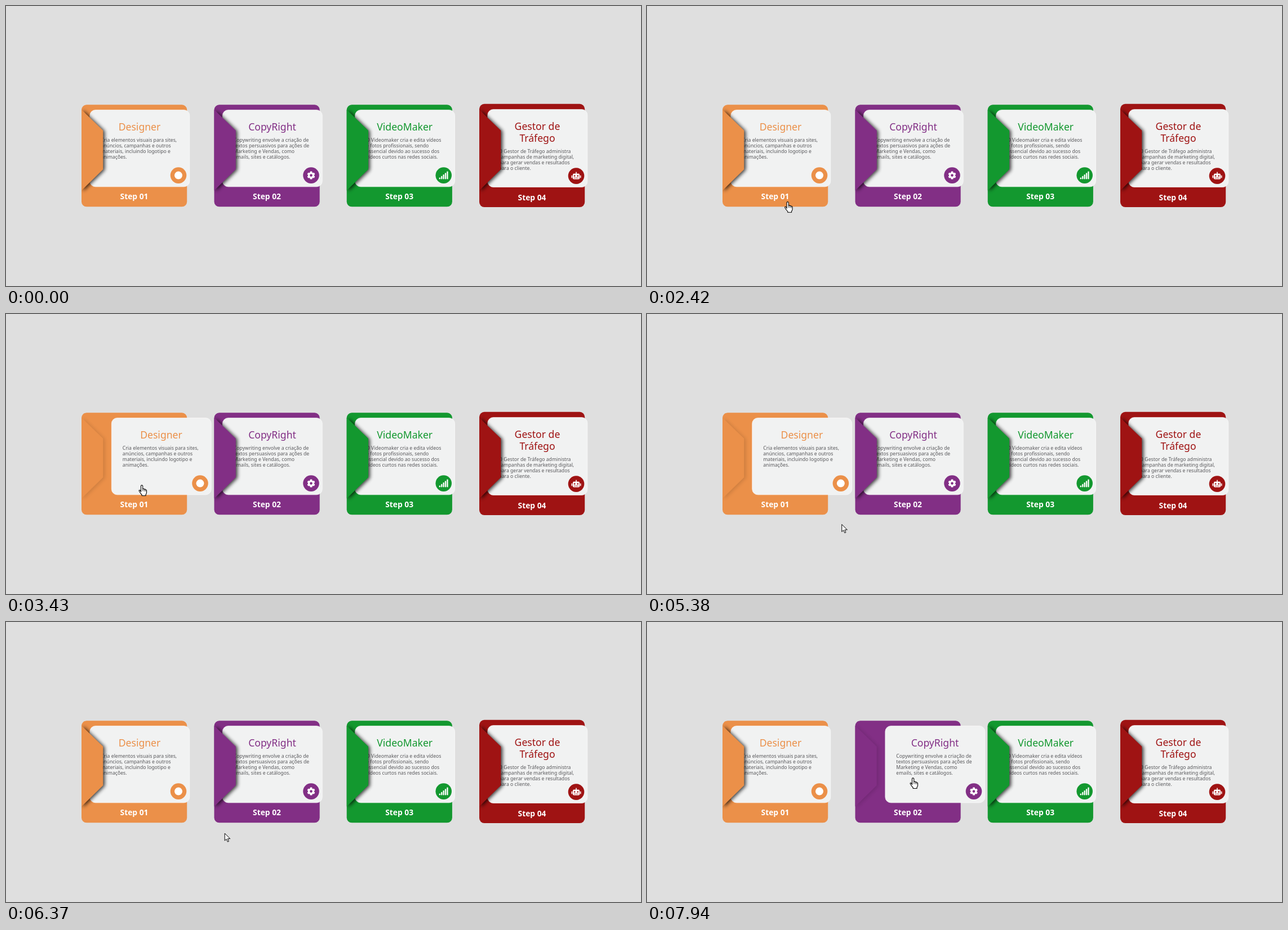
Animation, 1127 px wide and 497 px high, one loop 8 s. Source, as an HTML page:

```html
<!DOCTYPE html>
<html lang="pt">
<head>
<meta charset="utf-8">
<title>Steps</title>
<style>
  html, body { margin: 0; width: 100%; height: 100%; overflow: hidden; background: #dfdfdf; }
  svg { display: block; width: 100%; height: 100%; }
  text { font-family: "Noto Sans", "Open Sans", sans-serif; }
  .title { font-size: 17.6px; text-anchor: middle; }
  .body { font-size: 8.68px; fill: #58585b; }
  .step { font-size: 13.8px; font-weight: 700; fill: #fff; text-anchor: middle; }
</style>
</head>
<body>
<svg id="stage" viewBox="0 0 1127 497">
  <defs>
    <filter id="blur" x="-40%" y="-20%" width="180%" height="140%"><feGaussianBlur stdDeviation="3"/></filter>
  </defs>
  <g id="cards"></g>
  <g id="cursor" stroke="#000" stroke-linejoin="round" stroke-linecap="round">
    <path id="arrow" fill="#fff" stroke-width="1" d="M0 0V12.6L3 9.9 5.1 14.7 7.2 13.8 5.2 9.2H9.2Z"/>
    <g id="hand" stroke-width="1.1">
      <path fill="#fff" d="M-1.5 11.5V1.5a1.6 1.6 0 0 1 3.2 0V6.5q1.4-.9 2.6.5 1.5-.6 2.3.8 1.7-.2 1.9 1.6V13q0 2-1.5 3.5V18.5H.2V17Q-2 15-4.6 10.5-5.4 8.6-3.8 8.6-2.6 8.6-1.5 11.5Z"/>
      <path fill="none" stroke-width=".8" d="M1.7 7v3M4.3 7.4v2.9M6.6 8.2v2.3"/>
    </g>
  </g>
</svg>
<script>
const LOOP = 8000, TICK = 67.39, SLIDE = 38.5, FADE = 1000;
const $ = id => document.getElementById(id);

const teeth = [0, 60, 120].map(a =>
  `<rect x="-2" y="-7" width="4" height="14" rx="1.2" transform="rotate(${a})"/>`).join("");
const bars = [3, 5.7, 8.4, 11.1, 13.8].map((h, i) =>
  `<rect x="${-8 + i * 3.4}" y="${6.8 - h}" width="2.3" height="${h}" rx=".8"/>`).join("");

const cards = [
  { x: 134, color: "#eb9049", title: ["Designer"], icon: () => `<circle r="7"/>`,
    lines: ["Cria elementos visuais para sites,", "anúncios, campanhas e outros",
            "materiais, incluindo logotipo e", "animações."] },
  { x: 369.5, color: "#822f85", title: ["CopyRight"],
    icon: c => `<circle r="5.4"/>${teeth}<circle r="2.3" fill="${c}"/>`,
    lines: ["Copywriting envolve a criação de", "textos persuasivos para ações de",
            "Marketing e Vendas, como", "emails, sites e catálogos."] },
  { x: 604.7, color: "#13982f", title: ["VideoMaker"], icon: () => bars,
    lines: ["O Videomaker cria e edita vídeos", "e fotos profissionais, sendo",
            "essencial devido ao sucesso dos", "vídeos curtos nas redes sociais."] },
  { x: 840, color: "#9f1313", title: ["Gestor de", "Tráfego"], tall: 1,
    icon: c => `<rect x="-6" y="-4" width="12" height="10" rx="1.8"/><rect x="-.8" y="-7" width="1.6" height="4"/>
      <rect x="-8.5" y="-1" width="1.8" height="5" rx=".8"/><rect x="6.7" y="-1" width="1.8" height="5" rx=".8"/>
      <g fill="${c}"><circle cx="-2.8" r="1.3"/><circle cx="2.8" r="1.3"/>
      <rect x="-3.8" y="3" width="2" height="1.1"/><rect x="-1" y="3" width="2" height="1.1"/><rect x="1.8" y="3" width="2" height="1.1"/></g>`,
    lines: ["O Gestor de Tráfego administra", "campanhas de marketing digital,",
            "para gerar vendas e resultados", "para o cliente."] }
];

function cardMarkup({ x, color, title, icon, lines, tall = 0 }, i) {
  const rows = (list, cls, tx, y, gap, fill = "") => list.map((s, k) =>
    `<text class="${cls}" x="${tx}" y="${y + k * gap}" ${fill}>${s}</text>`).join("");
  const flap = "M0 184 38.3 221V290L0 327.5Z";
  return `<g transform="translate(${x} 0)">
    <clipPath id="clip${i}"><rect y="170" width="200" height="190"/></clipPath>
    <rect y="${175.3 - tall * 1.5}" width="187.2" height="${181 + tall * 2.3}" rx="9" fill="${color}"/>
    <g id="panel${i}"><g transform="translate(14.3 0)">
      <rect x=".5" y="${184.5 - tall}" width="177" height="${136.3 + tall * 1.7}" rx="10" fill="#f1f2f2" stroke="#fff" stroke-opacity=".6"/>
      ${rows(title, "title", 88.7, 220.7 - tall * .8, 20.6, `fill="${color}"`)}
      ${rows(lines, "body", 20, 241.2 + tall * 20, 10)}
      <g transform="translate(157.7 ${300.6 + tall})" fill="#fff"><circle r="14.3" fill="${color}"/>${icon(color)}</g>
    </g></g>
    <g clip-path="url(#clip${i})"><path id="shade${i}" d="${flap}" transform="translate(3 1)" filter="url(#blur)"/></g>
    <path d="${flap}" fill="${color}"/>
    <text class="step" x="93.5" y="${343.3 + tall * 1.3}">Step 0${i + 1}</text>
  </g>`;
}
$("cards").innerHTML = cards.map(cardMarkup).join("");

// time, x, y of the pointer tip
const path = [
  [460, 1010, 486], [1200, 672, 435], [1620, 425, 425], [1770, 425, 425], [2420, 248, 347],
  [2630, 244, 318], [3000, 241, 304], [4640, 241, 304], [5320, 318, 355], [5380, 346, 374],
  [5450, 358, 381], [5850, 371.5, 385], [6310, 385, 380], [6390, 405, 352], [6720, 458, 277],
  [7740, 458, 277], [7940, 472, 277]
];

function pointAt(t) {
  const k = path.findIndex(p => p[0] > t);
  if (k < 0) return path[path.length - 1].slice(1);
  if (k === 0) return path[0].slice(1);
  const [t0, x0, y0] = path[k - 1], [t1, x1, y1] = path[k];
  const u = (t - t0) / (t1 - t0);
  return [x0 + (x1 - x0) * u, y0 + (y1 - y0) * u];
}

// cubic-bezier(.25, .1, .25, 1)
function ease(x) {
  if (x <= 0) return 0;
  if (x >= 1) return 1;
  const curve = (a, b, s) => 3 * a * s * (1 - s) ** 2 + 3 * b * s * s * (1 - s) + s ** 3;
  let lo = 0, hi = 1;
  for (let i = 0; i < 24; i++) {
    const mid = (lo + hi) / 2;
    if (curve(.25, .25, mid) < x) lo = mid; else hi = mid;
  }
  return curve(.1, 1, lo);
}

const since = (t, start) => ease((t - start) / FADE);

function render(time) {
  const t = 460 + Math.floor((time - 452) / TICK) * TICK;
  const open = [since(t, 2420) - since(t, 5350), since(t, 6390), 0, 0];
  open.forEach((p, i) => {
    $("panel" + i).setAttribute("transform", `translate(${p * SLIDE} 0)`);
    $("shade" + i).setAttribute("opacity", .75 - .63 * p);
  });
  const [x, y] = pointAt(t);
  const pointing = (t > 2380 && t < 5350) || t > 6390;
  $("cursor").setAttribute("transform", `translate(${x} ${y})`);
  $("cursor").setAttribute("visibility", t < 459 ? "hidden" : "visible");
  $("arrow").style.display = pointing ? "none" : "";
  $("hand").style.display = pointing ? "" : "none";
}

const start = performance.now();
function frame() {
  render((performance.now() - start) % LOOP);
  requestAnimationFrame(frame);
}
frame();
</script>
</body>
</html>
```
